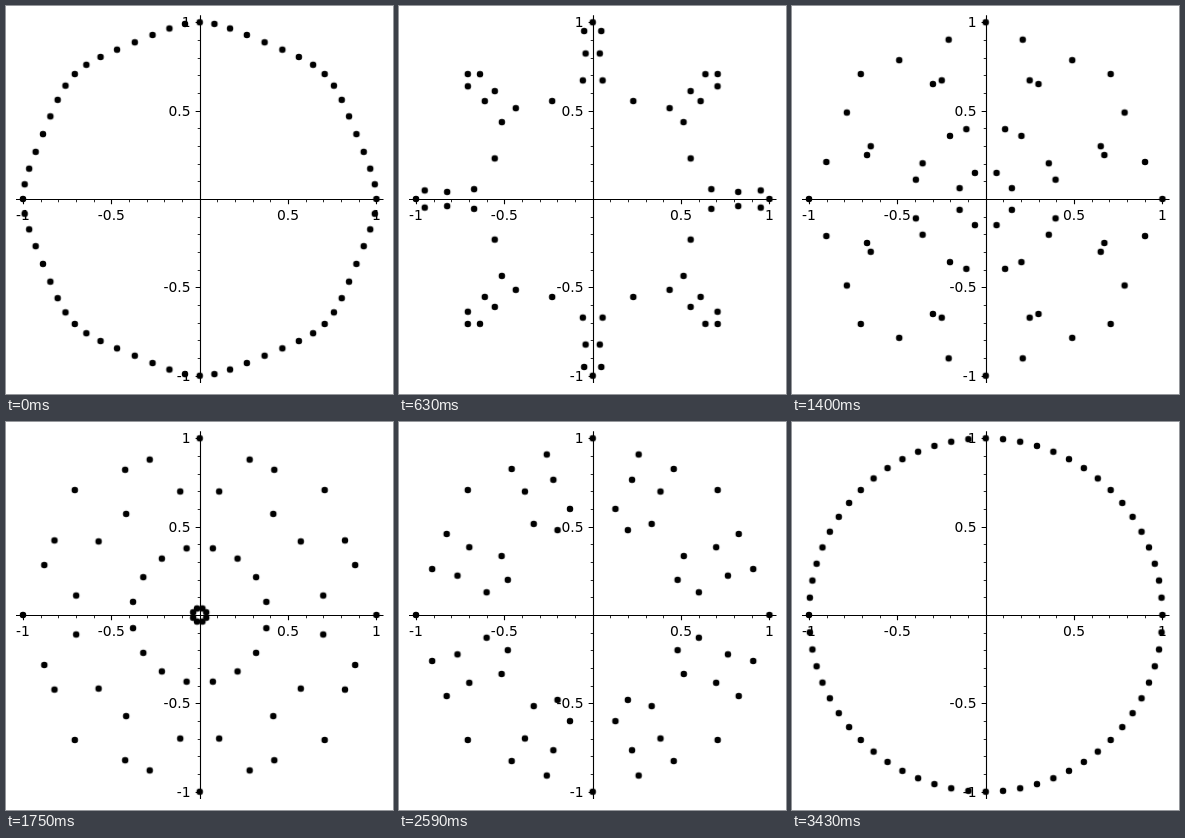
An HTML page that plays this animation: 387x388 px, repeating every 3500 ms.

```html
<!DOCTYPE html>
<html lang="en">
<head>
<meta charset="utf-8">
<title>Points on a rolling curve</title>
<style>
  html, body { margin: 0; width: 100%; height: 100%; overflow: hidden; background: #fff; }
  svg { display: block; width: 387px; height: 388px; }
  text { font: 13.89px "DejaVu Sans", sans-serif; }
  .axes { stroke: #000; stroke-width: 1.11; fill: none; }
  .minor { stroke-width: .83; }
  .dot { animation: roll 3500ms steps(50, jump-none) infinite; }
  @keyframes roll {
    from { transform: translate(var(--x0), var(--y0)); }
    to { transform: translate(var(--x1), var(--y1)); }
  }
</style>
</head>
<body>
<svg viewBox="0 0 387 388" id="plot"></svg>
<script>
  const CX = 193.7, CY = 193, R = 176.7;   // origin and unit length
  const AX = 194.5, AY = 193.5;            // axis lines on whole pixels
  const COUNT = 64, STEPS = 50;
  const plot = document.getElementById('plot');

  function add(tag, attrs, text) {
    const el = document.createElementNS('http://www.w3.org/2000/svg', tag);
    for (const key in attrs) el.setAttribute(key, attrs[key]);
    if (text) el.textContent = text;
    plot.appendChild(el);
    return el;
  }

  const snap = v => Math.floor(v + 0.5) + 0.5;

  // Axes and ticks
  let major = `M10 ${AY}H377.5M${AX} 9.3V377`;
  let minor = '';
  for (let i = -10; i <= 10; i++) {
    if (!i) continue;
    const big = i % 5 === 0, len = big ? 4.86 : 2.78;
    const x = snap(CX + i * R / 10), y = snap(CY - i * R / 10);
    const d = `M${x} ${AY}v${len}M${AX} ${y}h${-len}`;
    if (big) major += d; else minor += d;
  }
  add('path', { class: 'axes', d: major });
  add('path', { class: 'axes minor', d: minor });

  // Labels
  for (const v of [-1, -0.5, 0.5, 1]) {
    add('text', { x: CX + v * R, y: 214, 'text-anchor': 'middle' }, String(v));
    add('text', { x: 184.5, y: Math.round(CY - v * R + 5), 'text-anchor': 'end' }, String(v));
  }

  // Each dot slides along the chord from angle t to angle -7t
  function spot(t, a) {
    return [
      CX + R * ((1 - a) * Math.cos(t) + a * Math.cos(7 * t)),
      CY - R * ((1 - a) * Math.sin(t) - a * Math.sin(7 * t))
    ];
  }
  for (let i = 0; i < COUNT; i++) {
    const t = 2 * Math.PI * i / COUNT;
    const dot = add('circle', { class: 'dot', r: 3.24 });
    [1 / STEPS, 1].forEach((a, n) => {
      const [x, y] = spot(t, a);
      dot.style.setProperty('--x' + n, x.toFixed(3) + 'px');
      dot.style.setProperty('--y' + n, y.toFixed(3) + 'px');
    });
  }
</script>
</body>
</html>
```
